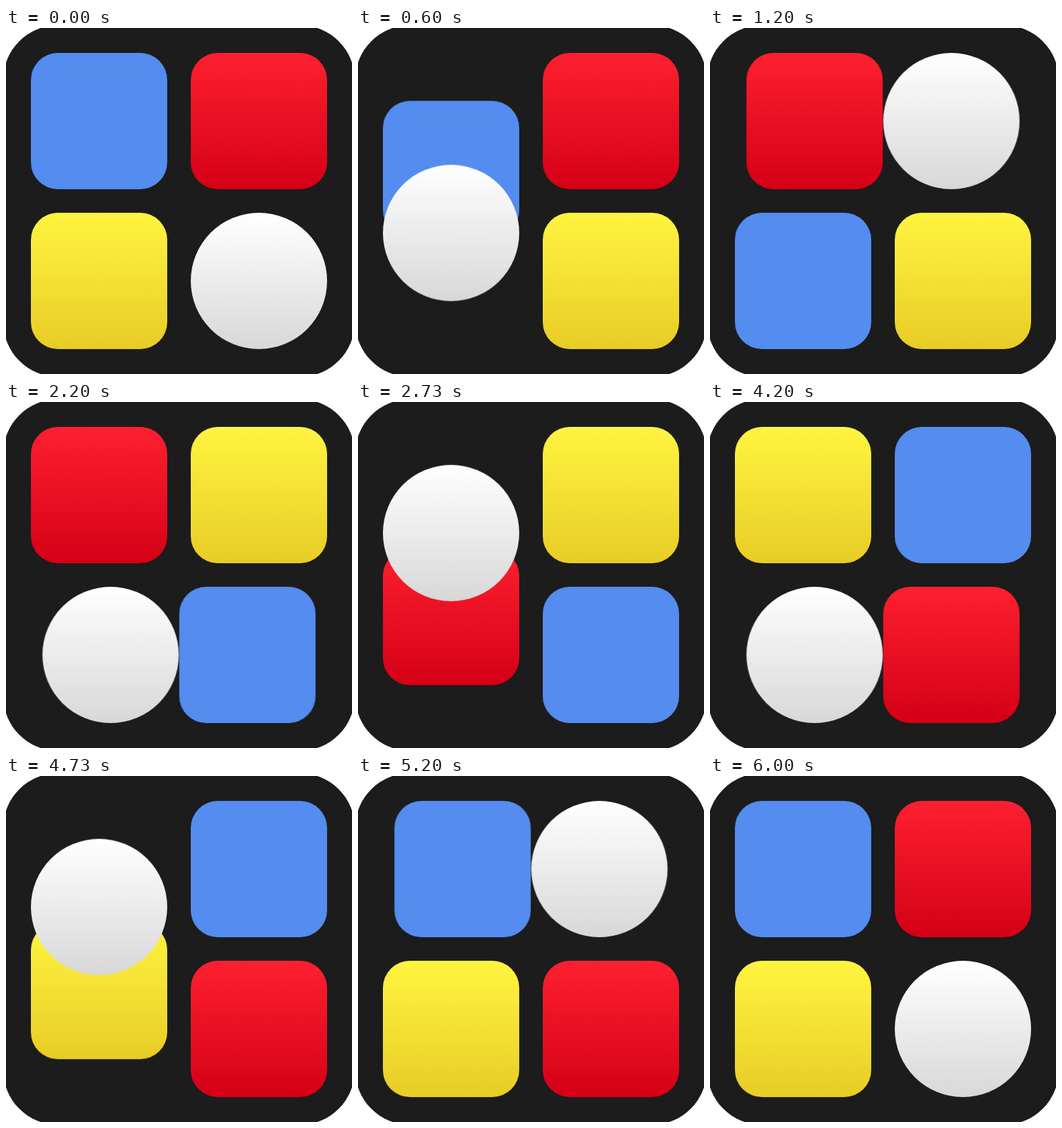
Write an HTML page without scripts that moves like this. It is 500x500 px and loops after 6.06 s.

```html
<!DOCTYPE html>
<html lang="en">
<head>
<meta charset="utf-8">
<title>Sliding tiles</title>
<style>
  :root {
    /* Ease-out slide sampled at 15 fps; the 500 ms beat alternates frame phase */
    --on-beat: linear(0 0% 11.5%, .346 11.5% 25.5%, .742 25.5% 39.5%, .928 39.5% 51.5%, .993 51.5% 65.5%, 1 65.5% 100%);
    --off-beat: linear(0 0% 5.5%, .113 5.5% 19.5%, .576 19.5% 31.5%, .852 31.5% 45.5%, .97 45.5% 59.5%, 1 59.5% 100%);
    --tl: translate(0, 0);
    --tr: translate(231px, 0);
    --bl: translate(0, 231px);
    --br: translate(231px, 231px);
  }
  html, body {
    margin: 0;
    width: 100%;
    height: 100%;
    overflow: hidden;
    background: #fff;
  }
  .stage {
    position: absolute;
    top: 0;
    left: 0;
    width: 500px;
    height: 500px;
    overflow: hidden;
  }
  /* The board bleeds slightly past the stage */
  .board {
    position: absolute;
    inset: -4px;
    border-radius: 79px;
    background: #1c1c1c;
  }
  .tile {
    position: absolute;
    top: 36px;
    left: 36px;
    width: 197px;
    height: 197px;
    border-radius: 39px;
    animation: 6060ms var(--on-beat) infinite;
  }
  .blue { background: #548cef; animation-name: blue; }
  .red { background: linear-gradient(#fd2030, #d50016); animation-name: red; }
  .yellow { background: linear-gradient(#fff440, #e8cc26); animation-name: yellow; }
  .white { background: linear-gradient(#fff, #d8d8d8); border-radius: 50%; animation-name: white; }

  @keyframes blue {
    0% { transform: var(--tl); }
    8.25% { transform: var(--tl); animation-timing-function: var(--off-beat); }
    16.5%, 33% { transform: var(--bl); }
    41.25% { transform: var(--br); }
    57.75% { transform: var(--br); animation-timing-function: var(--off-beat); }
    66%, 82.5% { transform: var(--tr); }
    90.75%, 100% { transform: var(--tl); }
  }
  @keyframes red {
    0%, 16.5% { transform: var(--tr); }
    24.75% { transform: var(--tl); }
    41.25% { transform: var(--tl); animation-timing-function: var(--off-beat); }
    49.5%, 66% { transform: var(--bl); }
    74.25% { transform: var(--br); }
    90.75% { transform: var(--br); animation-timing-function: var(--off-beat); }
    99%, 100% { transform: var(--tr); }
  }
  @keyframes yellow {
    0% { transform: var(--bl); }
    8.25% { transform: var(--br); }
    24.75% { transform: var(--br); animation-timing-function: var(--off-beat); }
    33%, 49.5% { transform: var(--tr); }
    57.75% { transform: var(--tl); }
    74.25% { transform: var(--tl); animation-timing-function: var(--off-beat); }
    82.5%, 100% { transform: var(--bl); }
  }
  @keyframes white {
    0%, 33%, 66%, 99%, 100% { transform: var(--br); }
    8.25%, 41.25%, 74.25% { transform: var(--bl); animation-timing-function: var(--off-beat); }
    16.5%, 49.5%, 82.5% { transform: var(--tl); }
    24.75%, 57.75%, 90.75% { transform: var(--tr); animation-timing-function: var(--off-beat); }
  }
</style>
</head>
<body>
  <div class="stage">
    <div class="board"></div>
    <div class="tile blue"></div>
    <div class="tile red"></div>
    <div class="tile yellow"></div>
    <div class="tile white"></div>
  </div>
</body>
</html>
```
